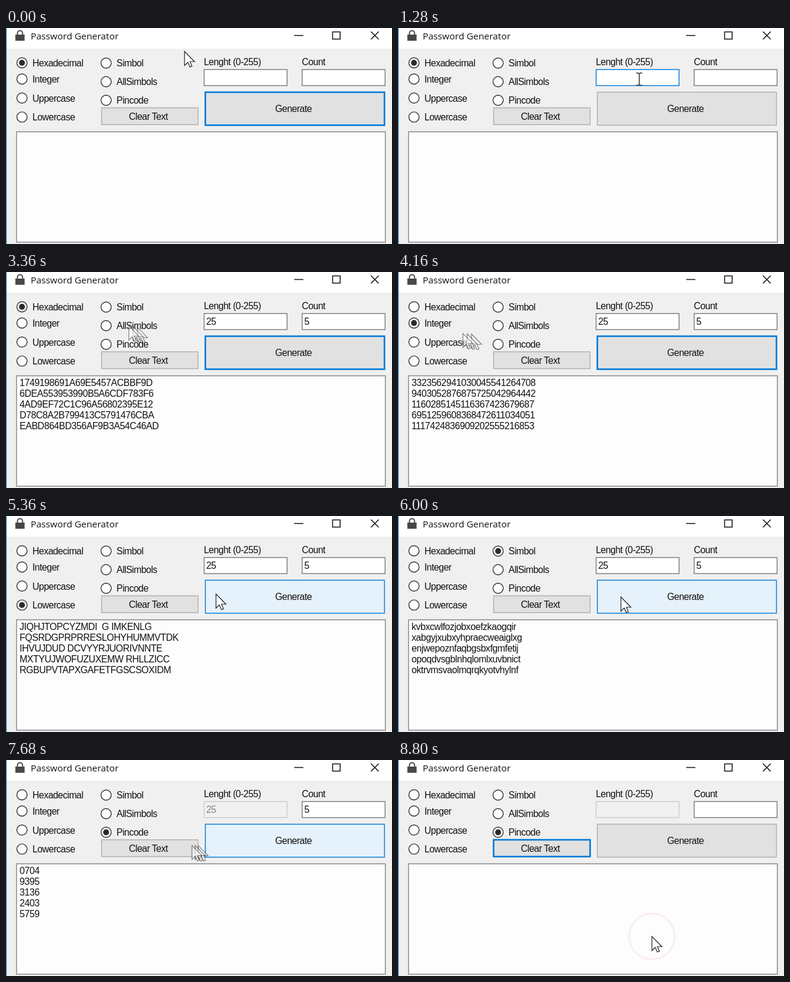
An HTML page that plays this animation: 640 px wide and 360 px high, repeating every 8.88 s.

```html
<!DOCTYPE html>
<html lang="en">
<head>
<meta charset="utf-8">
<title>Password Generator</title>
<style>
html, body { margin: 0; width: 100%; height: 100%; overflow: hidden; background: #f0f0f0; }
svg { display: block; width: 100%; height: 100%; }
text { font: 15.6px "Liberation Sans", Arial, sans-serif; letter-spacing: -.55px; fill: #111; white-space: pre; }
.title { font: 15.3px "Open Sans", sans-serif; letter-spacing: 0; }
.out { letter-spacing: -.45px; }
.signs { letter-spacing: .25px; }
.mid { text-anchor: middle; }
</style>
</head>
<body>
<svg id="stage" viewBox="0 0 640 360"></svg>
<script>
const LOOP = 8880, STEP = 80, BLUE = '#0078d7';
const stage = document.getElementById('stage');

function set(el, attrs) {
  for (const key in attrs) el.setAttribute(key, attrs[key]);
}
function add(tag, attrs, text) {
  const el = document.createElementNS('http://www.w3.org/2000/svg', tag);
  set(el, attrs);
  if (text) el.textContent = text;
  stage.append(el);
  return el;
}
const box = (x, y, width, height, fill, stroke = 'none') =>
  add('rect', { x, y, width, height, fill, stroke, 'stroke-width': 1.4 });
const label = (x, y, text, cls = '') => add('text', { x, y, class: cls }, text);
const line = (d, stroke, width, fill = 'none') =>
  add('path', { d, stroke, fill, 'stroke-width': width });

// Window frame
box(0, 0, 640, 360, '#f0f0f0');
box(0, 0, 640, 34.5, '#fff');
box(0, 0, 1.2, 360, '#2f87c4');
line('M19 12V8.5a4.2 4.2 0 0 1 8.4 0V12', '#5a5a60', 2.2);
box(15.5, 11, 15.3, 10.3, '#46464b');
label(41, 19, 'Password Generator', 'title');
line('M478 12.5H493M541.5 6.5H554V18.5H541.5ZM605 6L618 19M618 6L605 19', '#111', 1.5);

// Controls
const names = ['Hexadecimal', 'Integer', 'Uppercase', 'Lowercase', 'Simbol', 'AllSimbols', 'Pincode'];
const radios = names.map((name, i) => {
  const left = i < 4;
  const cx = left ? 26.5 : 166;
  const cy = !left ? 58.5 + 31 * (i - 4) : i ? 85 + 31.7 * (i - 1) : 58;
  add('circle', { cx, cy, r: 8.5, fill: '#fff', stroke: '#333', 'stroke-width': 1.4 });
  label(cx + 17.3, cy + 5.8, name);
  return { cx, cy, dot: add('circle', { cx, cy, r: 4.9, fill: '#2b2b2b' }) };
});

function makeField(x, name) {
  label(x, 62, name);
  return { x, frame: box(x + .5, 69.3, 137.5, 26.7, '#fff'), value: label(x + 4, 88, '') };
}
const lengthField = makeField(328, 'Lenght (0-255)');
const countField = makeField(490.5, 'Count');

function makeButton(x, y, w, h, text) {
  const frame = box(x, y, w, h, '#e1e1e1');
  label(x + w / 2 - 2.5, y + h / 2 + 5.5, text, 'mid');
  return { frame, hit: p => p[0] >= x && p[0] <= x + w && p[1] >= y && p[1] <= y + h };
}
const clearBtn = makeButton(158.5, 133, 160, 28, 'Clear Text');
const generateBtn = makeButton(330.5, 107, 297, 55, 'Generate');

box(17.5, 173, 611.5, 184, '#fdfdfd', '#828282');
const lines = [0, 1, 2, 3, 4].map(i => label(22.5, 190 + i * 18, '', 'out'));

// Passwords of each mode
let seed = 7;
const rand = n => (seed = seed * 16807 % 2147483647) % n;
const randomRows = chars => lines.map(() =>
  Array.from({ length: 25 }, () => chars[rand(chars.length)]).join(''));
const lower = 'abcdefghijklmnopqrstuvwxyz', digits = '0123456789';

const rows = [
  randomRows(digits + 'ABCDEF'),
  `3323562941030045541264708
9403052876875725042964442
1160285145116367423679687
6951259608368472611034051
1117424836909202555216853`.split('\n'),
  `JIQHJTOPCYZMDI  G IMKENLG
FQSRDGPRPRRESLOHYHUMMVTDK
IHVUJDUD DCVYYRJUORIVNNTE
MXTYUJWOFUZUXEMW RHLLZICC
RGBUPVTAPXGAFETFGSCSOXIDM`.split('\n'),
  randomRows(lower),
  String.raw`"|/!.^\^_(<")}$+^]#.+{\"#
{/.:.*}_{?,]<_+,$$;/*[,[\
%]::}}[/._)[<|!%?'.%<{)<"
(_/$;[.%/[{,;@#^;]"#%}<'\
\,@?!>_/:^#.[#>+?[\}&]["'`.split('\n'),
  randomRows(lower + lower.toUpperCase() + digits + '!@#$%^&*()_+[]{}<>?/'),
  ['0704', '9395', '3136', '2403', '5759']
];

// Timeline: time, pointer target, effect on the state
const events = [];
const at = (time, point, change) => events.push({ time, point, change });
const overLength = [400, 85], overCount = [541, 92], rest = [421, 294];

at(0, [296, 39], {});
at(800, overLength, { focus: 'length' });
at(1360, overLength, { length: '2' });
at(1520, overLength, { length: '25' });
at(2320, overCount, { focus: 'count' });
at(2640, overCount, { count: '5' });
radios.forEach(({ cx, cy }, mode) => {
  const time = 3220 + 720 * mode;
  if (mode) at(time - 480, [cx + 57, cy - 16], { mode, focus: 'radio' });
  at(time, [Math.max(348, 284 + 21.4 * mode), 115 + 5 * mode], { shown: mode, focus: 'generate' });
});
at(8000, [213, 140], { shown: -1, length: '', count: '', focus: 'clear' });
at(8640, rest, {});

// The pointer leaves shortly after each event and waits at the next target
function pointer(t) {
  const i = events.findIndex(e => e.time > t);
  if (i < 0) return rest;
  if (!i) return events[0].point;
  const a = events[i - 1], b = events[i];
  const travel = Math.max(220, (b.time - a.time) / 2);
  const u = Math.min(1, Math.max(0, (t - a.time - 20) / travel));
  return a.point.map((v, k) => v + (b.point[k] - v) * u);
}

const ring = add('circle', { cx: rest[0], cy: rest[1], fill: 'none', stroke: '#f3a9b3', 'stroke-width': 3 });
const arrows = [2, 1, 0].map(lag => ({
  lag, el: line('M0 0V23.5L5.5 18.2L9 26L12.4 24.6L9 17H16.5Z', '#222', 1.2, '#fff')
}));
const beam = line('M-5 -10H-1.5L0 -8.5L1.5 -10H5M0 -8.5V9M-5 10.5H-1.5L0 9L1.5 10.5H5', '#333', 1.5);

function paintButton(btn, hover, focused) {
  set(btn.frame, {
    fill: hover ? '#e5f1fb' : '#e1e1e1',
    stroke: hover || focused ? BLUE : '#adadad',
    'stroke-width': focused && !hover ? 2.6 : 1.4
  });
}
function paintField(field, text, focused, disabled) {
  set(field.frame, {
    fill: disabled ? '#f0f0f0' : '#fff',
    stroke: disabled ? '#ccc' : focused ? BLUE : '#7a7a7a'
  });
  field.value.textContent = text;
  field.value.style.fill = disabled ? '#858585' : '#111';
}

function render(t) {
  const s = { mode: 0, shown: -1, length: '', count: '', focus: 'generate' };
  for (const e of events) if (t >= e.time) Object.assign(s, e.change);

  radios.forEach(({ dot }, i) => set(dot, { opacity: +(i === s.mode) }));
  paintField(lengthField, s.length, s.focus === 'length', s.mode === 6);
  paintField(countField, s.count, s.focus === 'count', false);
  lines.forEach((el, i) => {
    el.textContent = s.shown < 0 ? '' : rows[s.shown][i];
    set(el, { class: s.shown === 4 ? 'signs' : 'out' });
  });

  // Hover lags a little behind the pointer
  const late = pointer(t - 60);
  paintButton(generateBtn, generateBtn.hit(late), s.focus === 'generate');
  paintButton(clearBtn, clearBtn.hit(late), s.focus === 'clear');

  // Fast moves leave a trail of three translucent arrows
  const [x, y] = pointer(t), [px, py] = pointer(t - 6);
  const fast = Math.hypot(x - px, y - py) > 2;
  const inField = y > 69 && y < 96 && [lengthField, countField].some(f => x > f.x && x < f.x + 138);
  set(beam, { transform: `translate(${x} ${y})`, opacity: +inField });
  for (const { el, lag } of arrows) {
    set(el, {
      transform: `translate(${pointer(t - lag * 6)})`,
      opacity: inField ? 0 : fast ? .55 : +(lag === 0)
    });
  }

  const grow = (t - 8560) / 240;
  set(ring, { r: 14 + 24 * Math.max(0, grow), opacity: grow <= 0 ? 0 : .6 - .4 * grow });
}

function tick() {
  render(Math.floor(performance.now() % LOOP / STEP) * STEP);
  requestAnimationFrame(tick);
}
tick();
</script>
</body>
</html>
```
